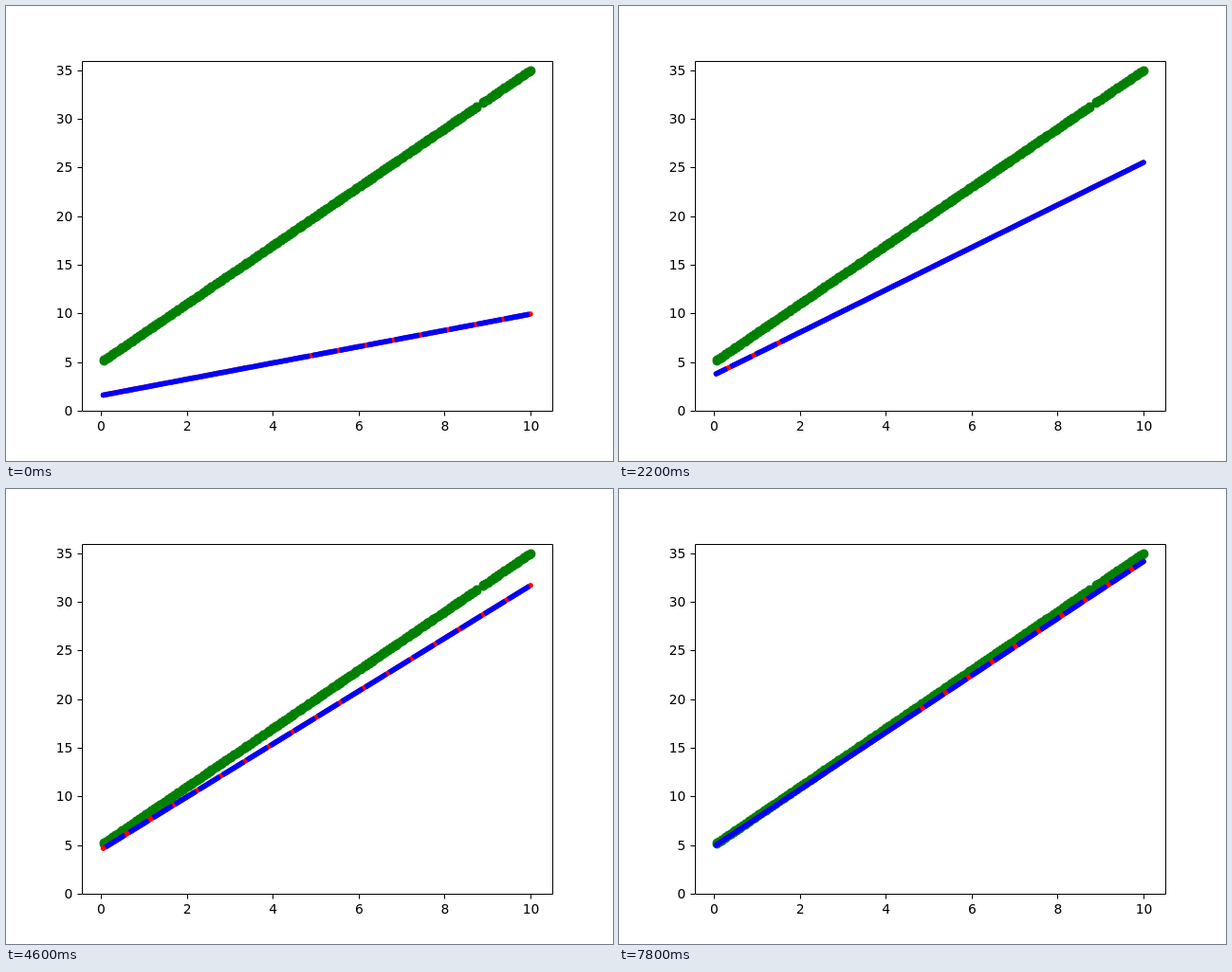
An HTML page for the animation above (8 s loop, 640x480 px).

```html
<!DOCTYPE html>
<html lang="en">
<head>
<meta charset="utf-8">
<title>Line fit</title>
<style>
  html, body { margin: 0; width: 100%; height: 100%; overflow: hidden; background: #fff; }
  svg { display: block; width: 640px; height: 480px; }
  text { font: 13.89px "DejaVu Sans", sans-serif; fill: #000; }
  path, polyline { fill: none; }
  #axes { stroke: #000; stroke-width: 1; }
  #data { stroke: #008000; stroke-width: 10; stroke-linecap: round; }
  #dots { stroke: #f00; stroke-width: 5.4; stroke-linecap: round; }
  #fit { stroke: #00f; stroke-width: 5.56; stroke-linejoin: round; stroke-dasharray: 20.56 8.89; }
</style>
</head>
<body>
<svg viewBox="0 0 640 480">
  <path id="data"/>
  <path id="dots"/>
  <polyline id="fit"/>
  <path id="axes"/>
  <g id="labels"></g>
</svg>
<script>
const LOOP = 8000, STEP = 200;
const LEFT = 102.5, RIGHT = 553;
const GOAL = { left: 374.5, right: 68.5 };
const GAP = { left: 36, right: 256.5 };
const DECAY = 0.0888;
// The dashed line runs first -> right end -> left end -> last.
const FIRST = 0.168, LAST = 0.45;

const $ = id => document.getElementById(id);
const mix = (a, b, u) => a + (b - a) * u;
const snap = v => Math.floor(v) + 0.5;

function label(text, x, y, anchor) {
  const el = document.createElementNS($('labels').namespaceURI, 'text');
  el.textContent = text;
  el.setAttribute('x', x);
  el.setAttribute('y', y);
  el.setAttribute('text-anchor', anchor);
  $('labels').append(el);
}

function drawAxes() {
  let d = 'M80.5 58.5H576.5V427.5H80.5Z';
  for (let v = 0; v <= 10; v += 2) {
    const x = 100.5 + v * 45.3;
    d += `M${snap(x)} 428v4.5`;
    label(v, x, 448, 'middle');
  }
  for (let v = 0; v <= 35; v += 5) {
    const y = snap(427.3 - v * 10.26);
    d += `M80 ${y}h-4.5`;
    label(v, 70.3, y + 4.9, 'end');
  }
  $('axes').setAttribute('d', d);
}

function drawData() {
  let seed = 7, d = '';
  const random = () => (seed = seed * 16807 % 2147483647) / 2147483647;
  for (let i = 0; i < 1000; i++) {
    const u = i < 2 ? i : random();
    if (u > 0.876 && u < 0.887) continue;
    d += `M${snap(mix(LEFT + 0.5, RIGHT, u))} ${snap(mix(GOAL.left, GOAL.right, u))}h0`;
  }
  $('data').setAttribute('d', d);
}

function drawFit(step) {
  const k = Math.exp(-DECAY * step);
  const yLeft = GOAL.left + GAP.left * k;
  const yRight = GOAL.right + GAP.right * k;
  const at = u => `${mix(LEFT, RIGHT, u)},${mix(yLeft, yRight, u)}`;
  $('dots').setAttribute('d', `M${at(0)}L${at(1)}`);
  $('fit').setAttribute('points', [FIRST, 1, 0, LAST].map(at).join(' '));
}

const start = performance.now();
let shown = -1;
function tick() {
  const step = Math.floor((performance.now() - start) % LOOP / STEP);
  if (step !== shown) drawFit(shown = step);
  requestAnimationFrame(tick);
}

drawAxes();
drawData();
tick();
</script>
</body>
</html>
```
